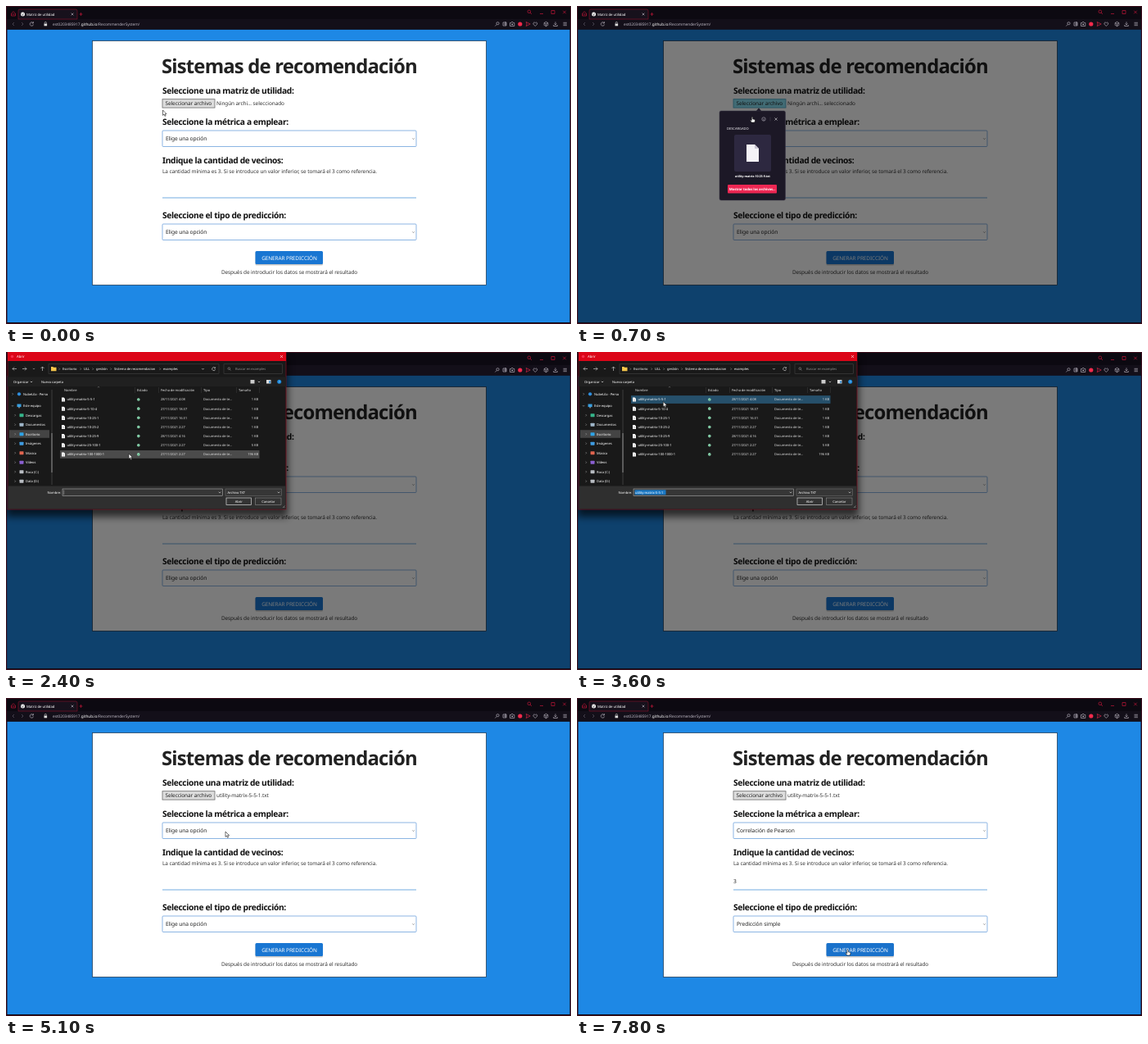
An HTML page for the animation above (8 s loop, 690 px wide and 388 px high).

```html
<!DOCTYPE html>
<html lang="es">
<head>
<meta charset="utf-8">
<title>Matriz de utilidad</title>
<style>
  html, body { margin: 0; width: 100%; height: 100%; overflow: hidden; background: #0e0a14; }
  svg { display: block; width: 100vw; height: 100vh; }
  text { font-family: "Noto Sans", "Open Sans", sans-serif; letter-spacing: -.012em; text-rendering: geometricPrecision; white-space: pre; }
  .bold { font-weight: 700; letter-spacing: -.035em; }
  .semi { font-weight: 600; letter-spacing: -.03em; }
  .mid { text-anchor: middle; }
  .end { text-anchor: end; }
  .shadow { filter: blur(5px); }
</style>
</head>
<body>
<svg id="stage" viewBox="0 0 690 388" preserveAspectRatio="none"></svg>
<script>
const DURATION = 8000;
const BODY = 6.45, FIELD = 6.65, SMALL = 4.05;
const ROW_TOP = 58, ROW_STEP = 11.15, OPTION = 13.3;

// Markup helpers; text is placed by the middle of its capitals.
const text = (x, y, size, str, fill = '#222', attrs = '') =>
  `<text x="${x}" y="${y + .36 * size}" font-size="${size}" fill="${fill}" ${attrs}>${str}</text>`;
const rect = (x, y, w, h, fill, attrs = '') =>
  `<rect x="${x}" y="${y}" width="${w}" height="${h}" fill="${fill}" ${attrs}/>`;
const line = (d, stroke, width = .6, attrs = '') =>
  `<path d="${d}" fill="none" stroke="${stroke}" stroke-width="${width}" ${attrs}/>`;
const shape = (d, fill, attrs = '') => `<path d="${d}" fill="${fill}" ${attrs}/>`;
const dot = (x, y, r, fill, attrs = '') => `<circle cx="${x}" cy="${y}" r="${r}" fill="${fill}" ${attrs}/>`;
const group = (id, ...parts) => `<g id="${id}">${parts.join('')}</g>`;
const cross = (x, y, r, color) =>
  line(`M${x - r} ${y - r}l${2 * r} ${2 * r}m0 ${-2 * r}l${-2 * r} ${2 * r}`, color);
const chevron = (x, y, color) => line(`M${x - 1.2} ${y - .6}l1.2 1.2 1.2-1.2`, color, .6);

function browser() {
  const grey = '#c9c5d0', red = '#e0193f', dimGrey = '#615b69';
  return rect(0, 0, 690, 28.5, '#0c0911') + rect(0, 16, 690, 12.5, '#130f19') +
    line('M.5 388V.5H689.5V387.5H0', '#4a1020', .8) +
    shape('M15 16V6q0-2 2-2H85q2 0 2 2V16Z', '#17111c', 'stroke="#a3122f" stroke-width=".5"') +
    line('M6.5 12V9l2-1.8h1l2 1.8v3ZM7.5 10h3', red) +
    dot(20.5, 10, 2.5, '#f2f2f2') + line('M18.5 9.5l2 1 1.5-2M20 12l1-1.5', '#33303a', .5) +
    text(25, 10, 4.3, 'Matriz de utilidad', '#fff') +
    cross(81, 10, 1.4, grey) + line('M89.5 10h4m-2-2v4', red) +
    dot(638.8, 6.8, 1.8, 'none', `stroke="${red}" stroke-width=".6"`) + line('M640 8l2 2', red) +
    line('M652 9.5h4M666 5.5h4v4h-4Z', red) + cross(682, 7.5, 1.8, red) +
    line('M10 20l-2 2 2 2M19 20l2 2-2 2', dimGrey, .7) +
    line('M33 20.5a2.2 2.2 0 1 0 .5 2M33.4 19v2h-2', grey) +
    rect(46.5, 21.5, 3.6, 2.8, '#ddd') + line('M47.2 21.5v-1a1.1 1.1 0 0 1 2.2 0v1', '#ddd') +
    text(57, 22, 4.8, 'est0203485917.<tspan fill="#fff">github.io</tspan>/RecommenderSystem/', '#bcb7c3') +
    dot(600.5, 21.2, 1.6, 'none', `stroke="${grey}" stroke-width=".6"`) + line('M599.3 22.5l-2 2', grey) +
    line('M607 20h4v4h-4ZM608 22h3M610 19v5', grey) +
    line('M615.5 20.5h1.3l.7-1h1.4l.7 1h1.2v4h-5.3Z', grey) + dot(618.2, 22.3, .9, grey) +
    dot(627.8, 22, 2.6, '#f32b4c') +
    line('M635.2 19.5l5 2.5-5 2.5.8-2.5Z', '#f32b4c') +
    line('M646.3 24.5l-2.2-2.2q-.8-1.7.7-2.3.9-.1 1.5.8.6-.9 1.5-.8 1.5.6.7 2.3Z', grey) +
    line('M659.5 19.3l2.3 1.3v2.8l-2.3 1.3-2.3-1.3v-2.8ZM657.2 20.6l2.3 1.3 2.3-1.3M659.5 22v2.7', grey) +
    line('M671 19.3v3.5m-1.5-1.3l1.5 1.5 1.5-1.5M668.7 23v1.5h4.6v-1.5', grey) +
    line('M680.5 20.3h4.4m-4.4 1.7h4.4m-4.4 1.7h4.4', grey);
}

function select(id, y) {
  return rect(191, y, 310, 19.5, '#fff', 'rx="1" stroke="#6fa3dc" stroke-width=".8"') +
    text(195, y + 10, FIELD, 'Elige una opción', '#222', `id="${id}"`) + chevron(497.5, y + 10, '#555');
}

function page() {
  const heading = (y, str) => text(191, y, 10.25, str, '#111', 'class="bold"');
  return rect(1.5, 28.5, 687, 357.5, '#1e88e5') +
    rect(105.5, 42.5, 481, 298, '#fff', 'stroke="#24405c" stroke-width=".8"') +
    text(190, 73.7, 23.9, 'Sistemas de recomendación', '#222', 'class="bold"') +
    heading(103, 'Seleccione una matriz de utilidad:') +
    rect(191, 113.7, 64, 10.4, '#dcdcdc', 'id="fileButton" stroke-width=".8"') +
    text(194.5, 119, BODY, 'Seleccionar archivo') +
    text(257, 119, BODY, '', '#333', 'id="fileName"') +
    heading(141.3, 'Seleccione la métrica a emplear:') + select('metric', 152) +
    heading(188.8, 'Indique la cantidad de vecinos:') +
    text(191, 202, BODY, 'La cantidad mínima es 3. Si se introduce un valor inferior, se tomará el 3 como referencia.', '#333') +
    text(191, 224, FIELD, '', '#222', 'id="neighbours"') +
    group('spinner', rect(496.2, 220.5, 4, 6.5, '#e4e4e4'),
      shape('M497 223l1.2-1.6 1.2 1.6ZM497 224.5l1.2 1.6 1.2-1.6Z', '#666')) +
    line('M191 234H501', '#4f97d8', .8, 'id="underline"') +
    heading(255, 'Seleccione el tipo de predicción:') + select('prediction', 266) +
    rect(304.5, 300, 82.5, 16.5, '#000', 'rx="1.5" opacity=".22"') +
    rect(304.5, 299, 82.5, 16, '#1976d2', 'id="submit" rx="1.5"') +
    text(346, 307.3, BODY, 'GENERAR PREDICCIÓN', '#fff', 'class="mid"') +
    text(346, 325, BODY, 'Después de introducir los datos se mostrará el resultado', '#333', 'class="mid"');
}

function popup() {
  return shape('M218.5 128.5l3.5-4 3.5 4Z', '#1c1826') +
    rect(174, 128, 80.5, 109, '#1c1826', 'rx="2" stroke="#3a3546" stroke-width=".5"') +
    dot(228, 138, 2.2, 'none', 'stroke="#ccc8d4" stroke-width=".5"') +
    line('M227 138.7q1 1.1 2 0M227.2 137.2v.4M228.8 137.2v.4', '#ccc8d4', .5) +
    line('M236 135.5v5', '#4a4556', .5) + cross(243, 138, 1.6, '#ddd') +
    text(183, 150, 4.1, 'DESCARGADO', '#f4f2f7', 'font-weight="500"') +
    rect(192, 157, 45, 45, '#2d2840', 'id="tile" rx="2"') +
    shape('M207 169h10l5 5v16h-15Z', '#f4f2f7') + shape('M217 169v5h5Z', '#c9c5d3') +
    text(214.3, 208, 3.75, 'utility-matrix-10-25-9.txt', '#fff', 'class="mid semi"') +
    rect(184, 218, 60, 10.5, '#f5234f', 'id="showAll" rx="1"') +
    text(214, 223.2, 4.3, 'Mostrar todos los archivos...', '#fff', 'class="mid semi"');
}

const FILES = [
  ['5-5-1', '28/11/2021 4:08', 1], ['5-10-4', '27/11/2021 18:37', 1], ['10-25-1', '27/11/2021 16:31', 1],
  ['10-25-2', '27/11/2021 2:27', 1], ['10-25-9', '28/11/2021 4:16', 1], ['25-100-1', '27/11/2021 2:27', 5],
  ['100-1000-1', '27/11/2021 2:27', 196]
];
const PLACES = [
  ['Descargas', '#35b58a'], ['Documentos', '#9fb6c9'], ['Escritorio', '#2ea3e6'], ['Imágenes', '#3f9be0'],
  ['Música', '#e0644f'], ['Vídeos', '#8a5fd0'], ['Roca (C:)', '#b8bcc2'], ['Data (D:)', '#b8bcc2']
];

function dialog() {
  const pale = '#fff', grey = '#b0b0b0';
  const label = (x, y, str, fill = pale, attrs) => text(x, y, SMALL, str, fill, attrs);
  const arrow = (x, y) => line(`M${x} ${y - 1.2}l1.2 1.2-1.2 1.2`, grey, .5);
  const crumbs = [[69, 'Escritorio'], [95, 'ULL'], [110, 'gestión'], [132, 'Sistema de recomendacion'], [192, 'examples']];
  const columns = [[71, 'Nombre'], [160, 'Estado'], [189, 'Fecha de modificación'], [241, 'Tipo'], [284, 'Tamaño']];
  return rect(0, 6, 344, 195, '#000', 'class="shadow" opacity=".65"') +
    rect(2, 0, 340, 192, '#191919', 'stroke="#8a0c22" stroke-width=".7"') +
    rect(2, 0, 340, 11, '#dc0a2c', 'id="titleBar"') + dot(7.5, 5.5, 1.8, '#f5304c') +
    text(13, 5.7, 4.3, 'Abrir', '#fff') + cross(336.5, 5.5, 1.5, '#fff') +
    line('M13 20.5H8m2-2l-2 2 2 2M20 20.5h5m-2-2l2 2-2 2M44.5 23v-5m-2 2l2-2 2 2', '#ddd', .6) + chevron(34, 20.5, grey) +
    rect(52, 14.8, 208, 11.7, '#191919', 'stroke="#4c4c4c" stroke-width=".5"') +
    shape('M55 18h2.3l.8.8h3.4v4.4H55Z', '#f5c64b') +
    crumbs.map(([x, name]) => arrow(x - 4.5, 20.7) + label(x, 20.7, name)).join('') +
    chevron(240.5, 20.7, pale) + line('M255.3 19.5a2 2 0 1 0 .3 1.6M255.6 18.3v1.5h-1.5', pale, .5) +
    rect(266, 14.8, 71.5, 11.7, '#191919', 'stroke="#4c4c4c" stroke-width=".5"') +
    dot(272.3, 20.2, 1.3, 'none', 'stroke="#aaa" stroke-width=".5"') + line('M273.2 21.2l1.3 1.3', grey, .5) +
    label(280, 20.7, 'Buscar en examples', '#8d8d8d') +
    rect(2, 30.5, 340, 11.5, '#202020') +
    label(9, 36.2, 'Organizar') + chevron(31, 36.4, pale) + label(43, 36.2, 'Nueva carpeta') +
    rect(298.5, 34, 5, 4.5, '#ccc') + chevron(309, 36.4, pale) +
    rect(318, 34, 5.5, 4.5, '#ddd') + rect(321.3, 35, 1.7, 3, '#3d8fd1') +
    dot(333.7, 36.2, 2.5, '#1a86d8') + text(333.7, 36.2, 3.8, '?', '#fff', 'class="mid"') +
    // Side tree
    arrow(7.5, 51.3) + dot(16, 51.3, 2.1, '#2f8fe0') + label(21, 51.3, 'NubeLila - Perso') +
    chevron(8, 65.7, grey) + rect(13.5, 63.5, 5, 3.6, '#3aa0e0') + rect(15, 67.5, 2, .7, '#ccc') + label(21, 65.7, 'Este equipo') +
    rect(4, 95.2, 49, 9.6, '#444') +
    PLACES.map(([name, color], i) => {
      const y = 77.2 + 11.5 * i;
      return arrow(10.5, y) + rect(16.5, y - 2, 5, 4, color, 'rx=".6"') + label(24, y, name);
    }).join('') +
    line('M56 46V162', '#2b2b2b', 2) + line('M56 99V147', '#8b8b8b', 1) +
    // File list
    columns.map(([x, name]) => label(x, 46.5, name, '#e4e4e4')).join('') +
    line('M111.8 43.3l1.2-1 1.2 1', grey, .4) +
    line('M157.5 43v7M186.5 43v7M238.5 43v7M281.5 43v7M309.5 43v7', '#444', .4) +
    rect(66, 0, 243.5, 9.8, '#26506b', 'id="selectedRow"') + rect(66, 0, 243.5, 9.8, '#4b4b4b', 'id="hoverRow"') +
    FILES.map(([name, date, size], i) => {
      const y = ROW_TOP + ROW_STEP * i;
      return shape(`M68 ${y - 2.5}h2.6l1.4 1.4v3.7h-4Z`, '#fff') + line(`M68.7 ${y}h2.5m-2.5 1.2h2.5`, '#888', .4) +
        label(74.5, y, 'utility-matrix-' + name) + dot(161.8, y, 1.8, '#8fd9b4') +
        line(`M161 ${y}l.6.6 1-1.1`, '#163', .4) + label(189, y, date, '#dedede') +
        label(241, y, 'Documento de te...', '#dedede') + label(308, y, size + ' KB', '#dedede', 'class="end"');
    }).join('') +
    // Footer
    rect(2.4, 163.5, 339.2, 28, '#2f2f2f') +
    label(67, 171.3, 'Nombre:', pale, 'class="end"') +
    rect(69, 167, 195.5, 8.6, '#363636', 'stroke="#c4c4c4" stroke-width=".5"') +
    rect(70.5, 168.3, 38, 6, '#1b78c4', 'id="nameMark"') + label(71, 171.3, '', '#fff', 'id="chosenName"') +
    line('M70.7 168.5v5.6', '#ddd', .4, 'id="nameCaret"') + chevron(261, 171.3, pale) +
    rect(268, 167, 68.5, 8.6, '#363636', 'stroke="#777" stroke-width=".5"') + label(270.5, 171.3, 'Archivo TXT') + chevron(333, 171.3, pale) +
    rect(269, 178, 30.5, 8.4, '#333', 'id="openButton" stroke="#d5d5d5" stroke-width=".7"') + label(284.3, 182.2, 'Abrir', '#fff', 'class="mid"') +
    rect(304.5, 178, 31.5, 8.4, '#333', 'stroke="#999" stroke-width=".5"') + label(320.3, 182.2, 'Cancelar', '#fff', 'class="mid"') +
    line('M338 190l2.5-2.5M339.5 190l1-1', '#aaa', .5);
}

function dropdown(id, top, options) {
  const height = OPTION * options.length;
  return group(id,
    rect(189, top, 314, height + 2.5, '#000', 'rx="1" opacity=".1"'),
    rect(191, top, 310, height, '#fff', 'stroke="#777" stroke-width=".6"'),
    rect(191.3, top, 309.4, OPTION, '#1e78d7', `id="${id}Mark"`),
    ...options.map((name, i) => text(195, top + OPTION * (i + .5), FIELD, name, '#222', 'class="option"')));
}

const METRICS = ['Elige una opción', 'Correlación de Pearson', 'Distancia coseno', 'Distancia Euclídea'];
const PREDICTIONS = ['Elige una opción', 'Predicción simple', 'Diferencia con la media'];
const OUTLINE = 'stroke="#111" stroke-width=".6" stroke-linejoin="round"';

document.getElementById('stage').innerHTML = rect(0, 0, 690, 388, '#0e0a14') + page() +
  dropdown('metricList', 171.7, METRICS) + dropdown('predictionList', 285.7, PREDICTIONS) +
  rect(1.5, 28.5, 687, 357.5, '#000', 'id="dim"') + browser() +
  group('popup', popup()) + group('dialog', dialog()) +
  group('cursor',
    group('arrow', shape('M0 0V6.4L1.5 5.1 2.5 7.4 3.6 6.9 2.6 4.7H4.6Z', '#fff', OUTLINE)),
    group('hand', shape('M-.7.6Q0-.5.7.6V2.8L2.9 3.3Q3.7 3.6 3.5 4.8L2.9 7H-.8L-2.5 4.4Q-2.2 3.3-.7 4.6Z', '#fff', OUTLINE)),
    group('beam', line('M-1.3-3h2.6M0-3V3M-1.3 3h2.6', '#333', .7)));

const el = Object.fromEntries([...document.querySelectorAll('[id]')].map(node => [node.id, node]));
const show = (id, on) => { el[id].style.display = on ? '' : 'none'; };
const set = (id, name, value) => el[id].setAttribute(name, value);
const write = (id, str) => { if (el[id].textContent !== str) el[id].textContent = str; };
const ramp = (t, from, to) => Math.min(1, Math.max(0, (t - from) / (to - from)));

// Pointer stops: time, x, y.
const PATH = [
  [0, 191.5, 127], [80, 191.5, 127], [300, 214, 119], [600, 214, 119], [900, 214, 180], [1000, 215, 190],
  [1200, 221.5, 223], [1950, 221.5, 223], [2200, 158, 140], [2400, 150, 124], [2550, 150, 124], [3100, 104, 62],
  [3300, 100, 57], [3550, 100, 57], [4050, 280, 180], [4450, 280, 180], [5000, 268, 163], [5200, 268, 163],
  [5550, 262, 191], [5750, 262, 191], [6000, 270, 229], [6300, 270, 233.5], [6500, 270, 233], [6900, 264, 274],
  [7100, 264, 274], [7400, 262, 305], [7550, 262, 305], [7700, 330.5, 307], [8000, 330.5, 307]
];
function pointer(t) {
  const i = PATH.findIndex(stop => stop[0] > t);
  const [t0, x0, y0] = PATH[i - 1], [t1, x1, y1] = PATH[i];
  const u = ramp(t, t0, t1), k = u * u * (3 - 2 * u);
  return [x0 + (x1 - x0) * k, y0 + (y1 - y0) * k];
}

function fade(id, amount, cx, cy, shrink) {
  const s = 1 - shrink * (1 - amount);
  show(id, amount > 0);
  set(id, 'opacity', amount);
  set(id, 'transform', `translate(${cx} ${cy}) scale(${s}) translate(${-cx} ${-cy})`);
}

function openList(id, on, top, y) {
  show(id, on);
  const options = el[id].querySelectorAll('.option');
  const active = Math.min(options.length - 1, Math.max(0, Math.floor((y - top) / OPTION)));
  set(id + 'Mark', 'y', top + OPTION * active);
  options.forEach((option, i) => option.setAttribute('fill', i === active ? '#fff' : '#222'));
}

function render(t) {
  const [x, y] = pointer(t);
  const within = (from, to) => t >= from && t < to;

  set('dim', 'opacity', .52 * (ramp(t, 350, 650) - ramp(t, 4200, 4390)));
  fade('popup', Math.min(1, 1.2 * ramp(t, 350, 650)) * (1 - ramp(t, 1800, 1950)), 214, 182, .05);
  set('tile', 'fill', within(800, 1150) ? '#3b3552' : '#2d2840');
  set('showAll', 'fill', within(1150, 1900) ? '#ff1f4d' : '#ee2753');

  const closing = ramp(t, 4320, 4520);
  fade('dialog', ramp(t, 2050, 2200) * (1 - closing), 172, 96, .065);
  const picked = t >= 3400;
  const row = Math.round((y + 1 - ROW_TOP) / ROW_STEP);
  show('hoverRow', x > 66 && x < 309 && row >= 0 && row < FILES.length && !(picked && row === 0));
  set('hoverRow', 'y', ROW_TOP + ROW_STEP * row - 4.9);
  show('selectedRow', picked);
  set('selectedRow', 'y', ROW_TOP - 4.9);
  show('nameMark', picked);
  show('nameCaret', !picked);
  write('chosenName', picked ? 'utility-matrix-5-5-1' : '');
  set('openButton', 'fill', t >= 4000 ? '#484848' : '#333');
  set('titleBar', 'fill', t >= 4250 ? '#2a2023' : '#dc0618');

  const pressed = within(250, 4300);
  set('fileButton', 'fill', pressed ? '#88e0f4' : '#dcdcdc');
  set('fileButton', 'stroke', pressed ? '#4aa6c4' : '#6b6b6b');
  write('fileName', t < 4300 ? 'Ningún archi... seleccionado' : 'utility-matrix-5-5-1.txt');
  write('metric', t < 5750 ? METRICS[0] : METRICS[1]);
  write('prediction', t < 7500 ? PREDICTIONS[0] : PREDICTIONS[1]);
  write('neighbours', t < 6450 ? '' : '3');
  const focused = within(6000, 6850);
  set('underline', 'stroke', focused ? '#1976d2' : '#4f97d8');
  set('underline', 'stroke-width', focused ? 1.3 : .8);
  show('spinner', within(5950, 6620));
  set('submit', 'fill', t >= 7700 ? '#1a72cb' : '#1976d2');
  openList('metricList', within(5150, 5750), 171.7, y);
  openList('predictionList', within(7000, 7500), 285.7, y);

  const hand = within(220, 1950) || t >= 7650, beam = within(5900, 6650);
  show('hand', hand);
  show('beam', beam);
  show('arrow', !hand && !beam);
  set('cursor', 'transform', `translate(${x} ${y})`);
}

function tick() {
  render(performance.now() % DURATION);
  requestAnimationFrame(tick);
}
tick();
</script>
</body>
</html>
```
